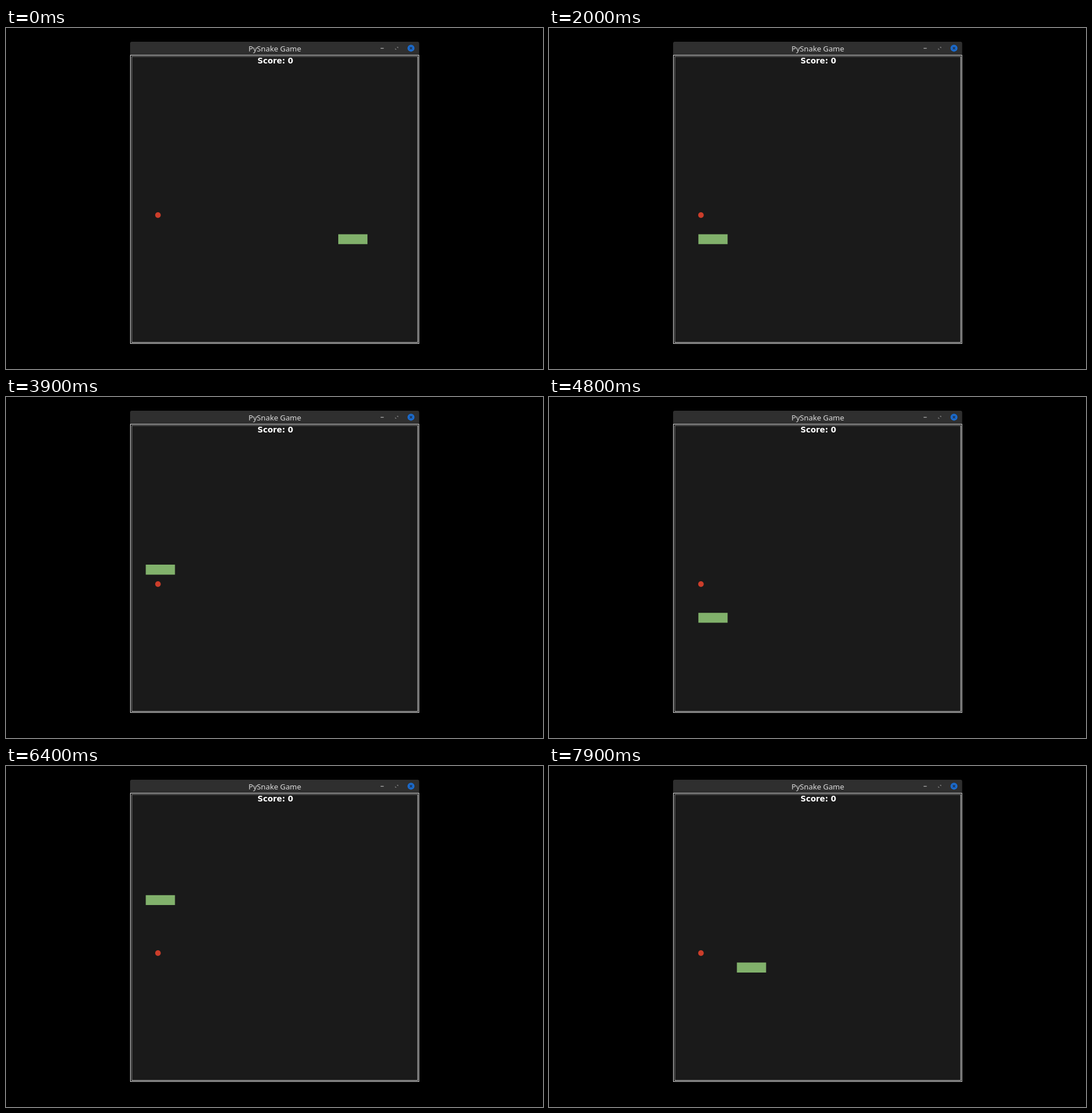
Recreate the animation shown at these times as an HTML page. Size 939 px wide and 596 px high, loop 8 s.

```html
<!DOCTYPE html>
<html lang="en">
<head>
<meta charset="utf-8">
<title>PySnake Game</title>
<style>
  html, body { margin: 0; width: 100%; height: 100%; overflow: hidden; background: #000; }
  svg { display: block; width: 939px; height: 596px; }
  text { text-anchor: middle; }
  .title { font: 500 13.2px "Noto Sans", sans-serif; fill: #dcdcdc; }
  .score { font: bold 13.5px "DejaVu Sans", sans-serif; fill: #fff; }
</style>
</head>
<body>
<svg viewBox="0 0 939 596">
  <rect width="939" height="596" fill="#000"/>

  <!-- title bar -->
  <path d="M217 47V27q0-3 3-3H719.500q3 0 3 3V47Z" fill="#2f2f2f"/>
  <text class="title" x="470" y="41">PySnake Game</text>
  <path d="M655 35.500h5.500" stroke="#a8a8a8" stroke-width="1.300"/>
  <path d="M683.200 33h2.500v2.500ZM680.500 35.300v2.500h2.500Z" fill="#8f8f8f"/>
  <circle cx="708.200" cy="35.300" r="6.100" fill="#1b6acb"/>
  <path d="M706.200 33.300l4 4m0-4l-4 4" stroke="#20304a" stroke-width="1.300"/>

  <!-- board -->
  <rect x="217" y="47" width="505.500" height="505" fill="#1a1a1a"/>
  <rect x="217.500" y="47.500" width="504.500" height="504" fill="none" stroke="#d8d8d8"/>
  <path d="M220 549.500V49.800H720" fill="none" stroke="#868686"/>
  <path d="M220 549.500H720V49.800" fill="none" stroke="#d0d0d0"/>
  <text class="score" x="471" y="62">Score: 0</text>

  <path id="snake" fill="#81b16b"/>
  <circle cx="265.700" cy="327" r="4.900" fill="#cb3d2a"/>
</svg>
<script>
  const LOOP = 8000, TICK = 100, STEP = 16.83, LENGTH = 3;
  const ORIGIN = { x: 244.4, y: 225.8 };
  const CELL = { w: 17.4, h: 17.3 };
  const ROUTE = 'L22 U5 R6 D1 L6 D5 R4 U1 L4 U8 R7 D7 L2';
  const DIRS = { L: [-1, 0], R: [1, 0], U: [0, -1], D: [0, 1] };
  const PAUSES = [9, 40, 70]; // ticks on which the snake waits

  // every grid cell the snake visits, starting at its tail
  const cells = [[22, 8]];
  for (const leg of ROUTE.split(' ')) {
    const [dx, dy] = DIRS[leg[0]];
    for (let n = +leg.slice(1); n > 0; n--) {
      const [x, y] = cells[cells.length - 1];
      cells.push([x + dx, y + dy]);
    }
  }

  const snake = document.getElementById('snake');

  function cellPath([col, row]) {
    const x = (ORIGIN.x + col * STEP).toFixed(2);
    const y = (ORIGIN.y + row * STEP).toFixed(2);
    return `M${x} ${y}h${CELL.w}v${CELL.h}h${-CELL.w}Z`;
  }

  function render(ms) {
    const tick = Math.floor((ms % LOOP) / TICK);
    const moved = tick - PAUSES.filter(p => p <= tick).length;
    snake.setAttribute('d', cells.slice(moved, moved + LENGTH).map(cellPath).join(''));
  }

  function loop() {
    render(performance.now() - start);
    requestAnimationFrame(loop);
  }

  const start = performance.now();
  loop();
</script>
</body>
</html>
```
